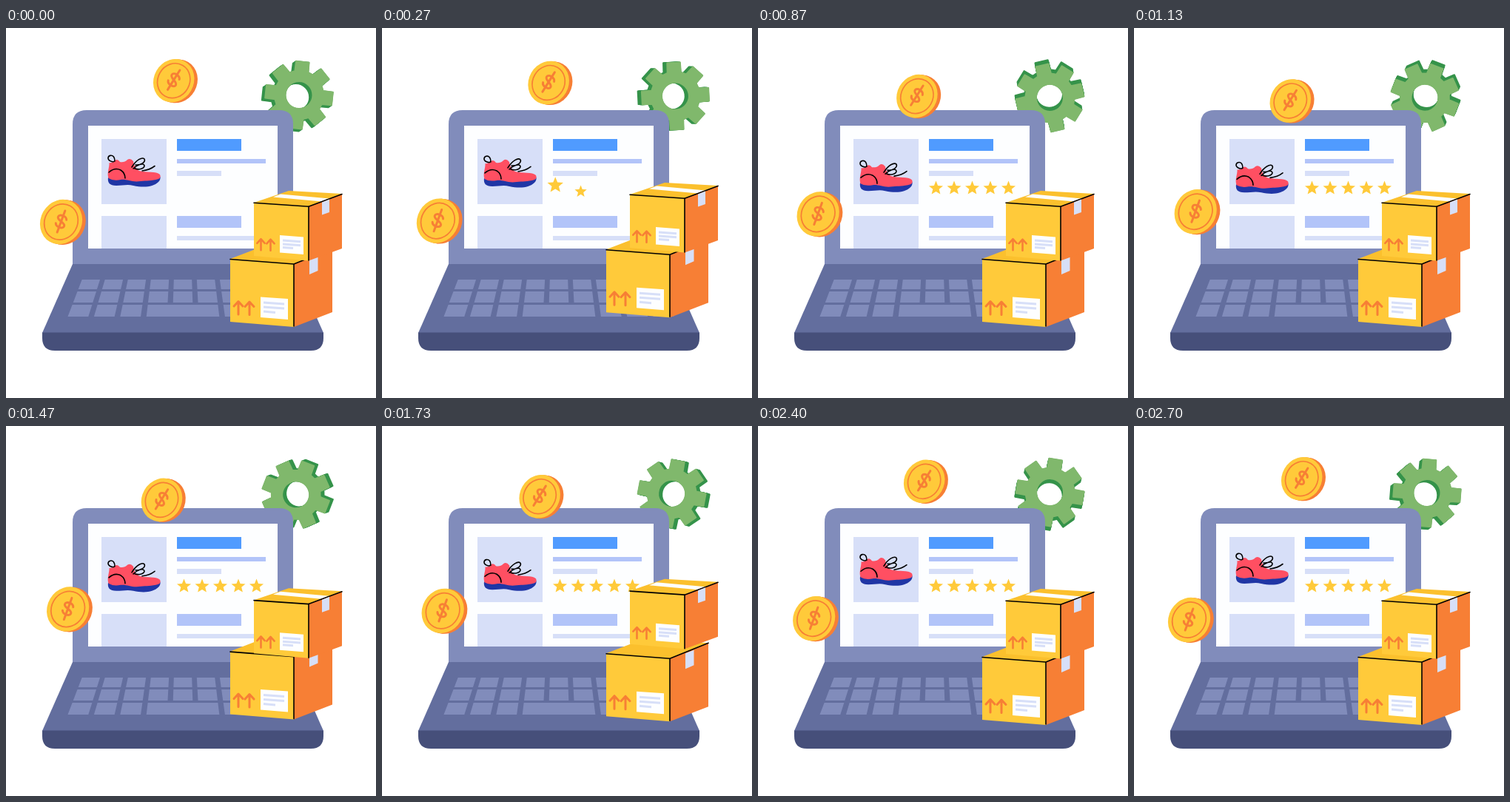
An HTML page for the animation above (2.73 s loop, 500 by 500 pixels).

```html
<!DOCTYPE html>
<html lang="en">
<head>
<meta charset="utf-8">
<title>Online shop</title>
<style>
  html, body { margin: 0; width: 100%; height: 100%; overflow: hidden; background: #fff; }
  svg { display: block; width: 100%; height: 100%; }
  .yellow { fill: #ffca3a; } .orange { fill: #f77f35; } .white { fill: #fdfeff; }
  .pale { fill: #d7dff8; } .soft { fill: #b2c4f9; } .slate { fill: #818cbb; }
  .line { fill: none; stroke: #000; stroke-width: 1.6; stroke-linecap: round; stroke-linejoin: round; }
  .ink { fill: none; stroke: #f77f35; stroke-linecap: round; stroke-linejoin: round; }
  .print { fill: none; stroke: #d7dff8; stroke-width: 3; }
</style>
</head>
<body>
<svg viewBox="0 0 500 500">
  <defs>
    <path id="star" class="yellow"/>
    <path id="cog" fill-rule="evenodd" stroke-width="2" stroke-linejoin="round"/>
    <g id="coin">
      <g class="orange">
        <ellipse rx="27" ry="30" transform="translate(4.5 .8) rotate(30)"/>
        <ellipse rx="27" ry="30" transform="translate(2.2 .4) rotate(30)"/>
      </g>
      <ellipse class="yellow" rx="27" ry="30" transform="rotate(30)"/>
      <ellipse class="ink" stroke-width="1.7" rx="21.5" ry="24" transform="rotate(30)"/>
    </g>
    <path id="dollar" class="ink" stroke-width="3" d="M6-4.5C4.5-9.5-6-9.5-6-4.5C-6 .5 6-.5 6 4.5C6 9.5-4.5 9.5-6 4.5M0-15.5V15.5"/>
    <path id="arrow" class="ink" stroke-width="3" stroke-linecap="butt" d="M0 9V-8M-6-2L0-8.500L6-2"/>
  </defs>

  <g id="gear">
    <g id="gearSide" fill="#35934a" stroke="#35934a"></g>
    <use href="#cog" x="2" y="-1.400" fill="#80b86c" stroke="#80b86c"/>
  </g>

  <path class="slate" d="M90 320V130Q90 111 109 111H369Q388 111 388 130V320Z"/>
  <path class="white" d="M111 132H367V298H111Z"/>
  <path fill="#636e9e" d="M90 319H388L429 412H49Z"/>
  <path fill="#464f7a" d="M49 411.500H429V419Q429 436 412 436H66Q49 436 49 419Z"/>
  <path id="keys" class="slate"/>

  <path class="pale" d="M129 150H217V238H129ZM129 254H217V298H129ZM231 193H291V200H231ZM231 281H351V287H231Z"/>
  <path class="soft" d="M231 177H351V183H231ZM231 254H318V270H231Z"/>
  <path fill="#509bff" d="M231 150H318V166H231Z"/>

  <g id="shoe">
    <path fill="#2036a5" d="M138 202C137 209 140 213 149 213C158 213 164 211 172 213C186 216 199 215 206 208Q209 205 208.500 201Z"/>
    <path fill="#ff4f62" d="M138.500 203C136 195 140 189 139.500 182Q144 183 147 179Q151 176.500 154 181Q160 182 164 178Q168 175 172 180Q173 189 180 193C190 196 203 193 208 198Q210 202 206 204C196 207 190 206 182 207C170 209 164 204 155 205Q145 207 138.500 203Z"/>
    <path class="line" stroke-width="1.400" d="M139 195Q147 188 155 192Q161 196 161 203M146.500 180C144 182 138 179 138 176C138 172 143 171 145.500 174Q147 176 147 180M170 188C176 178 184 174 187 177C189 181 182 186 175 185M172 190C178 184 186 182 187 186C187 190 180 192 174 190M184 193Q194 192 201 186.500"/>
  </g>

  <g id="stars"></g>

  <g id="lowBox">
    <path fill="#fbc02d" d="M303 312L355 292L441 298L389 319Z"/>
    <path class="yellow" d="M303 312L389 319V404L303 397Z"/>
    <path class="orange" d="M389 319L441 298V384L389 404Z"/>
    <path class="line" d="M303 312.500L389 319L441 298M389 319V403"/>
    <path class="pale" d="M410 312L421.500 307.500V328L410 333Z"/>
    <path class="white" d="M344 363.500L381 366V394L344 391Z"/>
    <path class="print" d="M348 371L376 373M348 377L376 379M348 383L364 384.500"/>
    <use href="#arrow" x="314" y="378"/><use href="#arrow" x="329" y="378.500"/>
  </g>

  <g id="highBox">
    <path fill="#fbc02d" d="M335 236L382 220L454 224L409 241Z"/>
    <path class="white" d="M361 228.500L371 224.500L437 230.500L427 234.500Z"/>
    <path class="yellow" d="M335 236L409 241V314.500L335 308Z"/>
    <path class="orange" d="M409 241L454 224V298L409 314.500Z"/>
    <path class="line" d="M335 236.300L409 241.300L454 224.500M409 241V314"/>
    <path class="pale" d="M427 235.500L437 231.500V249L427 252.500Z"/>
    <path class="white" d="M370 280L402 282.500V306L370 303.500Z"/>
    <path class="print" stroke-width="2.600" d="M374 287L398 288.700M374 292L398 293.700M374 296.500L388 297.500"/>
    <use href="#arrow" transform="translate(344.500 292.500) scale(.86)"/>
    <use href="#arrow" transform="translate(357.500 293) scale(.86)"/>
  </g>

  <g id="topCoin"><use href="#coin"/><use href="#dollar" transform="translate(0 -1) rotate(32)"/></g>
  <g id="leftCoin"><use href="#coin" transform="scale(1.03)"/><use href="#dollar" transform="translate(0 -.5) rotate(20)"/></g>
</svg>
<script>
const LOOP = 2730, SWAY = 2712;
const el = id => document.getElementById(id);
const move = (id, x, y) => el(id).setAttribute('transform', `translate(${x} ${y})`);
const clamp = v => Math.min(1, Math.max(0, v));
const ease = v => (1 - Math.cos(Math.PI * clamp(v))) / 2;
const polygon = points => 'M' + points.map(p => p.map(v => v.toFixed(2))).join('L') + 'Z';
const polar = (r, degrees) => {
  const a = (degrees - 90) * Math.PI / 180;
  return [r * Math.cos(a), r * Math.sin(a)];
};

// Gear: eight tapered teeth around a round hole
const teeth = [];
for (let i = 0; i < 8; i++) {
  const a = 6 + i * 45;
  teeth.push(polar(33, a - 16), polar(46, a - 11), polar(46, a + 11), polar(33, a + 16));
}
el('cog').setAttribute('d', polygon(teeth) + 'M18.5 0A18.5 18.5 0 1 0-18.5 0A18.5 18.5 0 1 0 18.5 0Z');
for (let k = -2.3; k < 2; k += 0.8) {
  el('gearSide').innerHTML += `<use href="#cog" x="${k}" y="${-0.7 * k}"/>`;
}

// Keyboard: columns spread with the slope of the base
const keyX = (u, y) => 239 + u * (149 + (y - 319) * 41 / 92);
const key = (from, to, top, bottom) => polygon([
  [keyX(from, top), top], [keyX(to, top), top], [keyX(to, bottom), bottom], [keyX(from, bottom), bottom]
]);
let keys = key(-0.273, 0.273, 374, 390);
[[340, 353], [356, 371], [374, 390]].forEach(([top, bottom], row) => {
  for (let c = -4; c <= 4; c++) {
    if (row < 2 || Math.abs(c) > 1) keys += key(c * 0.196 - 0.077, c * 0.196 + 0.077, top, bottom);
  }
});
el('keys').setAttribute('d', keys);

// Stars grow out of one shared point
const starPoints = [];
for (let i = 0; i < 10; i++) starPoints.push(polar(i % 2 ? 4.4 : 10, i * 36));
el('star').setAttribute('d', polygon(starPoints));
const stars = [-2, -1, 0, 1, 2].map(i => {
  const g = document.createElementNS('http://www.w3.org/2000/svg', 'g');
  g.innerHTML = `<use href="#star" x="${i * 24.5 - 0.5}" y="-31.500"/>`;
  return el('stars').appendChild(g);
});
const pop = ms => ms < 190 ? 1.15 * ease(ms / 190) : 1.15 - 0.15 * ease((ms - 190) / 180);

const hop = (t, start) => ease((t - start) / 250) - ease((t - start - 250) / 250);
const hops = (t, delay) => hop(t, delay) + hop(t, 1335 + delay);

function draw(now) {
  const t = now % LOOP;
  const sway = (1 - Math.cos(2 * Math.PI * t / SWAY)) / 2;
  move('topCoin', 226.7 - 16.5 * sway, 71.2 + 29.2 * sway);
  move('leftCoin', 74.5 + 9.3 * sway, 262 - 14.8 * sway);
  move('shoe', 0, 10 * sway);
  move('lowBox', 0, -13 * hops(t, 0));
  move('highBox', 0, -14.3 * hops(t, 100));
  el('gear').setAttribute('transform', `translate(394 92) rotate(${360 * t / SWAY})`);
  stars.forEach((star, i) => {
    star.setAttribute('transform', `translate(290 248) scale(${pop(t - 35 - 110 * i)})`);
  });
  requestAnimationFrame(() => draw(performance.now() - begin));
}
const begin = performance.now();
draw(0);
</script>
</body>
</html>
```
